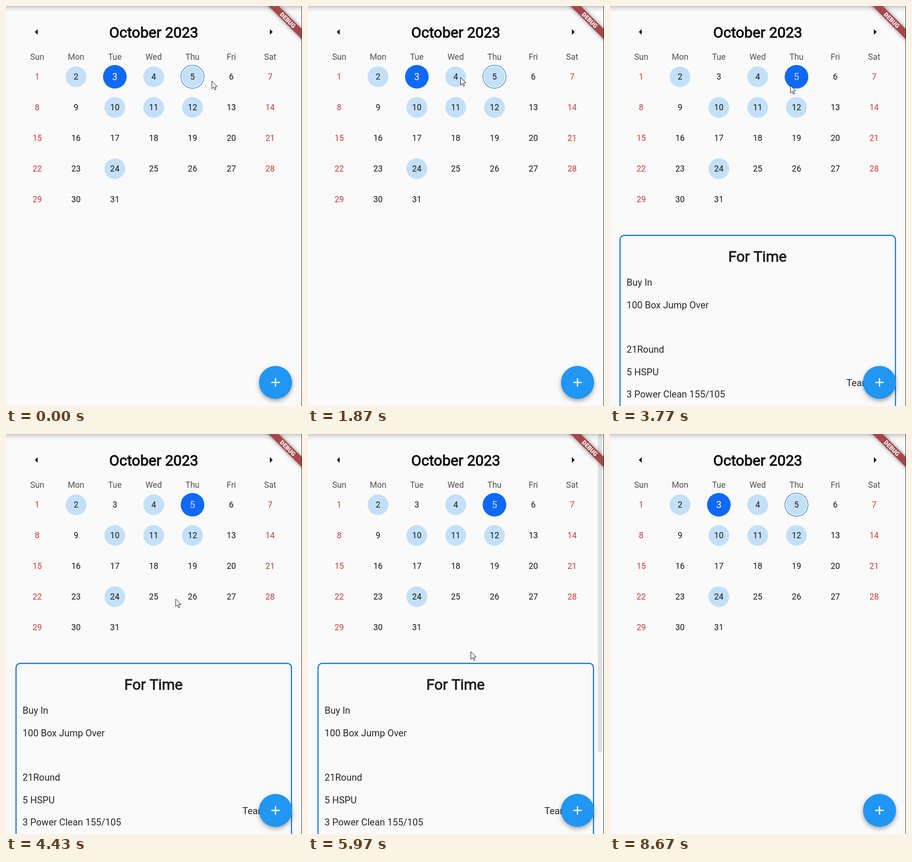
These frames come from a looping animation (626x848 px, 8710 ms). An HTML page with a canvas:

```html
<!DOCTYPE html>
<html lang="en">
<head>
<meta charset="utf-8">
<title>Workout calendar</title>
<style>
html, body { margin: 0; width: 100%; height: 100%; overflow: hidden; background: #fafafa; }
canvas { display: block; }
</style>
</head>
<body>
<canvas id="stage" width="626" height="848"></canvas>
<script>
const c = document.getElementById('stage').getContext('2d');
const LOOP = 8710, W = 626, H = 848, MAX_SCROLL = 217;
const PAPER = '#fafafa', BLUE = '#1069f5', PALE = '#c3e0f8', INK = '#161616', RED = '#cc3d38';
const PICK = 3500, UNPICK = 7350, FADE = 250;
const MARKED = [2, 4, 5, 10, 11, 12, 24];
const LINES = ['Buy In', '100 Box Jump Over', '', '21Round', '5 HSPU',
  '3 Power Clean 155/105', '30 DU', '', 'Cash Out', '100 Lateral Burpee'];
// Pointer stops: time, x, y
const STOPS = [[0, 435, 159], [1870, 322, 151], [3770, 381, 168], [5200, 330, 577],
  [5970, 344, 461], [7470, 251, 153], [8660, 640, 700], [LOOP, 640, 700]];

const ramp = (t, a, b) => Math.min(1, Math.max(0, (t - a) / (b - a)));
const ease = (t, a, b) => { const k = ramp(t, a, b); return k * k * (3 - 2 * k); };

// y is the middle of the capital letters
function text(s, x, y, size, color, align = 'center', bold = false) {
  c.font = `${size}px Roboto, sans-serif`;
  c.textAlign = align;
  c.fillStyle = c.strokeStyle = color;
  c.fillText(s, x, y + size * 0.355);
  if (bold) {
    c.lineWidth = 1;
    c.strokeText(s, x, y + size * 0.355);
  }
}

function disc(x, y, r, fill, alpha = 1) {
  c.globalAlpha = alpha;
  c.fillStyle = fill;
  c.beginPath();
  c.arc(x, y, r, 0, 7);
  c.fill();
  c.globalAlpha = 1;
}

function ring(x, y, r, color) {
  c.strokeStyle = color;
  c.lineWidth = 1.25;
  c.beginPath();
  c.arc(x, y, r, 0, 7);
  c.stroke();
}

function poly(points, fill) {
  c.beginPath();
  points.forEach(p => c.lineTo(...p));
  c.closePath();
  c.fillStyle = fill;
  c.fill();
}

function shadow(alpha, blur, y = 0) {
  c.shadowColor = `rgba(0,0,0,${alpha})`;
  c.shadowBlur = blur;
  c.shadowOffsetY = y;
}

function calendar(t) {
  const five = ease(t, PICK, PICK + FADE) - ease(t, UNPICK, UNPICK + FADE);
  const picked = t >= PICK && t < UNPICK ? 5 : 3;
  for (const [x, dir] of [[61, 1], [564, -1]])
    poly([[x, 55], [x + 6 * dir, 49], [x + 6 * dir, 61]], INK);
  text('October 2023', 312.5, 55.5, 31.25, '#080808', 'center', true);
  'Sun Mon Tue Wed Thu Fri Sat'.split(' ').forEach((name, i) =>
    text(name, 66 + i * 82.1, 108, 17.5, '#4f4f4f'));

  for (let day = 1; day <= 31; day++) {
    const col = (day - 1) % 7, x = 66 + col * 82.1, y = 150 + Math.floor((day - 1) / 7) * 65;
    if (MARKED.includes(day)) disc(x, y, 22, PALE, day === 5 && five > 0 ? 0 : 1);
    if (day === 3) disc(x, y, 25, BLUE, 1 - five);
    if (day === 5) {
      disc(x, y, 25, BLUE, five);
      if (five < 1) ring(x, y, 24.4, '#2d78c4');
    }
    if (day === picked) text(day, x, y, 20, day === 5 ? PALE : '#fff');
    else text(day, x, y, 17.5, col % 6 ? INK : RED);
  }
}

function card() {
  c.beginPath();
  c.roundRect(21.2, 486.2, 582.6, 577.6, 9);
  c.strokeStyle = '#1976d2';
  c.lineWidth = 2.4;
  c.stroke();
  text('For Time', 312, 530.5, 31.25, '#1f1f1f', 'center', true);
  LINES.forEach((line, i) => text(line, 35, 586 + i * 47.45, 20, '#272727', 'left'));
  text('Team of 3', 589.5, 799, 20, '#272727', 'right');
}

function scrollbar(t, scroll) {
  c.globalAlpha = ramp(t, 4450, 4650) * (1 - ramp(t, 6480, 6780));
  c.fillStyle = '#e0e0e0';
  c.beginPath();
  c.roundRect(613, scroll * H / (H + MAX_SCROLL), 9, H * H / (H + MAX_SCROLL), 4);
  c.fill();
  c.globalAlpha = 1;
}

function topShade() {
  const g = c.createLinearGradient(0, 0, 0, 13);
  g.addColorStop(0, 'rgba(0,0,0,.2)');
  g.addColorStop(0.4, 'rgba(0,0,0,.08)');
  g.addColorStop(1, 'rgba(0,0,0,0)');
  c.fillStyle = g;
  c.fillRect(0, 0, W, 13);
}

function addButton() {
  shadow(0.35, 10, 4);
  disc(570, 798, 35, '#2196f3');
  shadow(0, 0);
  c.fillStyle = '#fff';
  c.fillRect(561, 796.7, 18, 2.6);
  c.fillRect(568.7, 789, 2.6, 18);
}

function banner() {
  c.save();
  c.translate(W, 0);
  c.rotate(Math.PI / 4);
  shadow(0.5, 8);
  c.fillStyle = '#a8464a';
  c.fillRect(-60, 35, 120, 15);
  shadow(0, 0);
  c.font = '900 12.75px Roboto, sans-serif';
  c.textAlign = 'center';
  c.fillStyle = '#fff';
  c.fillText('DEBUG', 0, 47);
  c.restore();
}

function pointer(t) {
  const i = STOPS.findIndex(p => p[0] > t);
  const [t0, x0, y0] = STOPS[i - 1], [t1, x1, y1] = STOPS[i], k = ease(t, t0, t1);
  c.save();
  c.translate(x0 + (x1 - x0) * k + 0.5, y0 + (y1 - y0) * k + 0.5);
  poly([[0, 0], [0, 16], [3.7, 12.5], [6.2, 18.5], [8.6, 17.4], [6.2, 11.7], [11.3, 11.4]], '#fff');
  c.strokeStyle = '#111';
  c.lineWidth = 1;
  c.stroke();
  c.restore();
}

function draw(now) {
  const t = now % LOOP;
  const scroll = MAX_SCROLL * (ease(t, 4450, 5150) - ease(t, 5300, 5920));
  c.fillStyle = PAPER;
  c.fillRect(0, 0, W, H);
  c.save();
  c.translate(0, -scroll);
  calendar(t);
  if (t >= PICK && t < UNPICK) card();
  c.restore();
  scrollbar(t, scroll);
  topShade();
  addButton();
  banner();
  c.fillStyle = '#262626';
  c.fillRect(625, 0, 1, H);
  pointer(t);
  requestAnimationFrame(draw);
}
requestAnimationFrame(draw);
</script>
</body>
</html>
```
